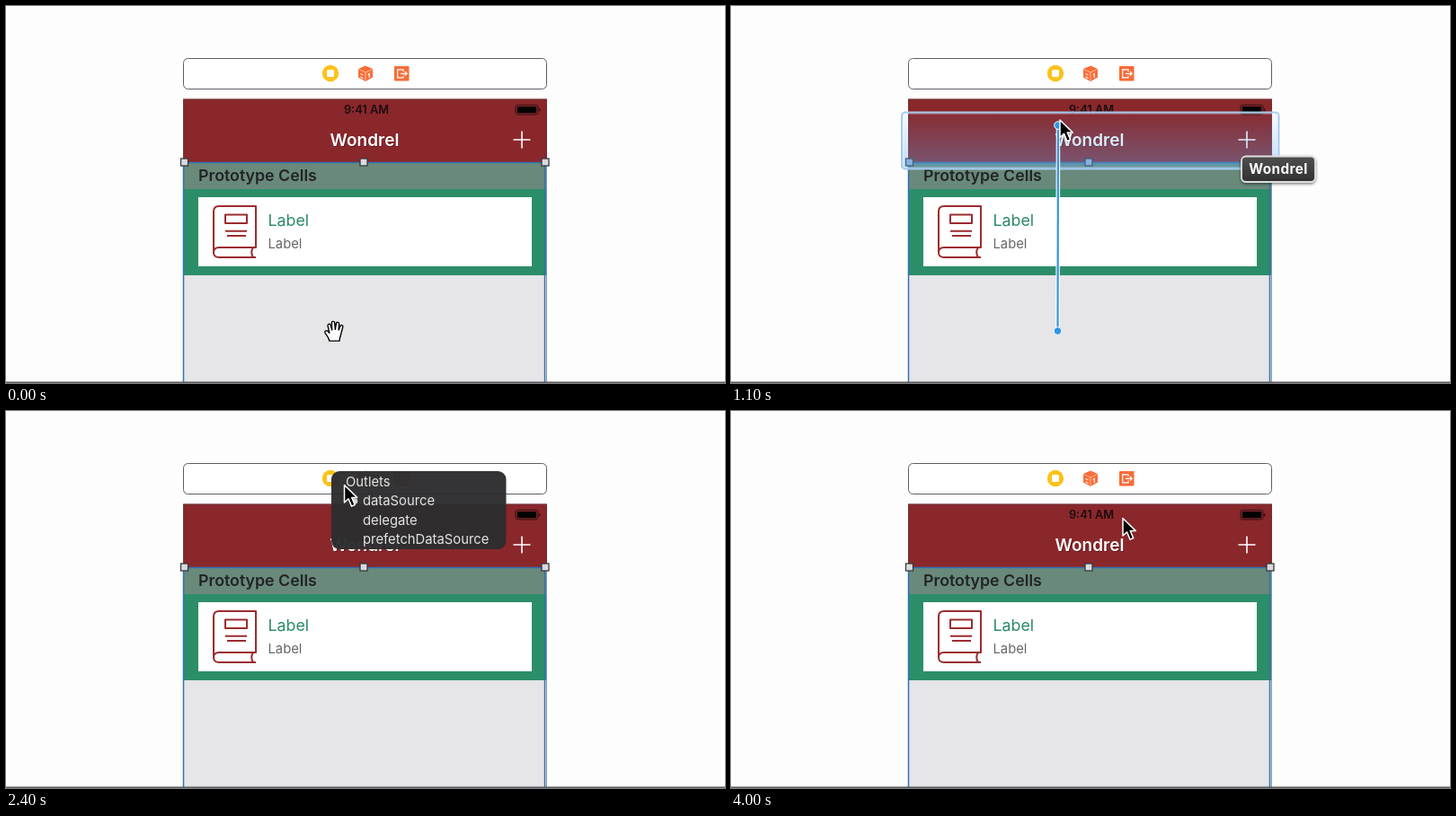
An HTML page for the animation above (4.1 s loop, 800 px wide and 420 px high).

```html
<!DOCTYPE html>
<html lang="en">
<head>
<meta charset="utf-8">
<title>Connecting an outlet</title>
<style>
html, body { margin: 0; width: 100%; height: 100%; overflow: hidden; background: #fefdfe; }
svg { display: block; width: 800px; height: 420px; font-family: Inter, Roboto, sans-serif; }
</style>
</head>
<body>
<svg viewBox="0 0 800 420" xmlns="http://www.w3.org/2000/svg">
  <defs>
    <linearGradient id="tint" x1="0" y1="0" x2="0" y2="1">
      <stop offset="0" stop-color="#5aaaf0" stop-opacity=".04"/>
      <stop offset="1" stop-color="#5aaaf0" stop-opacity=".38"/>
    </linearGradient>
    <linearGradient id="tipFill" x1="0" y1="0" x2="0" y2="1">
      <stop offset="0" stop-color="#505050"/>
      <stop offset="1" stop-color="#303030"/>
    </linearGradient>
    <filter id="soft" x="-20%" y="-40%" width="140%" height="190%">
      <feDropShadow dx="0" dy="1.5" stdDeviation="1.5" flood-opacity=".5"/>
    </filter>
  </defs>

  <rect width="800" height="420" fill="#fefdfe"/>

  <!-- scene dock -->
  <rect x="197.5" y="58.5" width="404" height="34" rx="5" fill="#fff" stroke="#5c5c66"/>
  <rect id="dockHit" x="348" y="62" width="26" height="26" rx="4" fill="#4a8fd8"/>
  <circle cx="361" cy="75" r="9.2" fill="#fcc21c"/>
  <rect x="357" y="71" width="8" height="8" rx="1.5" fill="#fff"/>
  <path d="M400 66.5 408 70V79.5L400 84 392 79.5V70Z" fill="#f96c38"/>
  <path d="M392.5 70.5 400 74 407.5 70.5M400 74V83" fill="none" stroke="#fdc3aa" stroke-width=".9"/>
  <path d="M394.5 75.5 397.5 77M394.5 79 397.5 80.5M402.8 76.5 404.2 75.5V80" fill="none" stroke="#fff" stroke-width="1.1"/>
  <rect x="432" y="67" width="16.5" height="16.5" rx="1" fill="#f96c38"/>
  <path d="M442 73V70.8H435.7V79.8H442V77.6M439 75.3H446M443.8 73 446.2 75.3 443.8 77.6" fill="none" stroke="#fff" stroke-width="1.2"/>

  <!-- navigation bar -->
  <rect x="197" y="103.5" width="405" height="71" fill="#8a272b"/>
  <path d="M197.5 174V104H601.5V174" fill="none" stroke="#5f3b40" stroke-opacity=".6"/>
  <text x="401" y="120" text-anchor="middle" font-size="12.8" font-weight="600" fill="#1c0d0e">9:41 AM</text>
  <rect x="567" y="110.3" width="25" height="10.6" rx="2.5" fill="none" stroke="#2d1011"/>
  <rect x="568.8" y="112" width="21.4" height="7.2" rx="1" fill="#000"/>
  <path d="M593.8 114V117.5" stroke="#2d1011" stroke-width="1.2"/>
  <text x="399.8" y="157" text-anchor="middle" font-size="19" font-weight="600" fill="#4b1013" fill-opacity=".6">Wondrel</text>
  <text x="399" y="156" text-anchor="middle" font-size="19" font-weight="600" fill="#fff">Wondrel</text>
  <path d="M564.5 149H583.5M574 139.5V158.5" stroke="#fff" stroke-width="1.6"/>

  <!-- table -->
  <rect x="197" y="174" width="405" height="30" fill="#69897b"/>
  <text x="214" y="195" font-size="17.8" font-weight="600" fill="#222426">Prototype Cells</text>
  <rect x="197" y="204" width="405" height="96" fill="#2c8e68"/>
  <rect x="214" y="213" width="371" height="77" fill="#fff"/>
  <rect x="197" y="300" width="405" height="120" fill="#e6e5e7"/>
  <g fill="none" stroke="#9b2c2f" stroke-width="2" stroke-linejoin="round">
    <path d="M231 275V229Q231 223 237 223H278V269H237Q231 269 231 274.500Q231 280 237 280H278M275 269Q271.500 274.500 275 280"/>
    <path d="M244 232.500H268V242H244ZM244 250.800H268M246 256H267"/>
  </g>
  <text x="291.500" y="244.500" font-size="17.800" fill="#2a8a65">Label</text>
  <text x="291.500" y="270" font-size="14.800" fill="#66666a">Label</text>
  <path d="M601.5 174V420" stroke="#8b98a4"/>
  <path d="M197.5 420V174.500H599.5V420" fill="none" stroke="#2d73b4" stroke-width="1.500"/>
  <g id="grips" fill="#d9dadd" stroke="#36383c" stroke-width="1.3">
    <rect x="194.500" y="170" width="8" height="8"/>
    <rect x="394" y="170" width="8" height="8"/>
    <rect x="596" y="170" width="8" height="8"/>
  </g>
  <rect y="418.500" width="800" height="1.500" fill="#5b5b60"/>

  <!-- drop target highlights -->
  <g id="tableHit">
    <rect x="190" y="166.500" width="420" height="663" rx="4" fill="url(#tint)" stroke="#adc9e6" stroke-width="1.500"/>
    <path d="M192 420V168.500H608V420" fill="none" stroke="#f4f9ff" stroke-opacity=".45" stroke-width="2"/>
  </g>
  <g id="barHit">
    <rect x="190" y="118.500" width="419.500" height="63" rx="4" fill="url(#tint)" stroke="#a5cbed" stroke-width="2"/>
    <rect x="191.500" y="120" width="416.500" height="60" rx="3" fill="none" stroke="#eef6ff" stroke-opacity=".45"/>
    <rect x="568" y="167.500" width="82" height="28.500" rx="5" fill="url(#tipFill)" stroke="#dededf" stroke-width="1.800" filter="url(#soft)"/>
    <text x="609" y="187" text-anchor="middle" font-size="15.300" font-weight="700" letter-spacing=".4" fill="#fff">Wondrel</text>
  </g>

  <!-- connection line -->
  <g id="wire">
    <path class="wireLine" stroke="#fff" stroke-opacity=".9" stroke-width="4.600"/>
    <path class="wireLine" stroke="#3795d8" stroke-width="2.200"/>
    <circle cx="363.500" cy="362" r="4.300" fill="#2f97e8" stroke="#fff"/>
    <circle id="wireEnd" r="4.300" fill="#2f97e8" stroke="#fff"/>
  </g>

  <!-- outlet menu -->
  <g id="menu" font-size="14.800" fill="#e4e4e5">
    <rect x="362" y="67" width="194.500" height="87" rx="9" fill="#2e2e30" fill-opacity=".97"/>
    <rect id="rowHit" x="362" width="194.500" height="21.500" fill="#111112"/>
    <text x="378" y="83.500">Outlets</text>
    <circle cx="388" cy="100.500" r="3.300" fill="#d0d0d1"/>
    <text x="397" y="105">dataSource</text>
    <text x="397" y="126.500">delegate</text>
    <text x="397" y="148">prefetchDataSource</text>
  </g>

  <!-- pointers -->
  <path id="hand" transform="translate(354 350) scale(1.4)" fill="#fff" stroke="#000" stroke-width="1" stroke-linejoin="round"
    d="M4.200 16.500C3.800 14 2 12 .9 10.400 0 9 1.400 7.600 2.800 8.800L4.200 10.200 2.900 4.600C2.600 3 4.600 2.400 5.100 4L6.200 7.800 6 2.200C6 .6 8.200 .6 8.400 2.200L8.800 7.400 9.600 2.600C9.900 1.200 12 1.400 11.900 3L11.500 7.800 12.800 4.800C13.400 3.400 15.200 4 14.800 5.600 14.200 8 13.800 9.400 13.400 11 13 12.800 12.200 14 12.200 16.500Z"/>
  <path id="arrow" fill="#000" stroke="#fff" stroke-width="1.500" stroke-linejoin="round"
    d="M0 0V19.500L4.500 15.300 8 23.600 11.700 22 8.200 13.900H14.200Z"/>
</svg>
<script>
const LOOP = 4100, STEP = 100;
const ANCHOR = [363.5, 362];
const $ = id => document.getElementById(id);
const lines = document.querySelectorAll('.wireLine');

// each key: time, x, y
const pointerKeys = [
  [500, 364, 358], [600, 363, 334], [700, 362.5, 290], [900, 363.5, 205], [1100, 366, 127],
  [1200, 366, 110], [1300, 365.5, 97], [1400, 365, 86], [1500, 364.5, 79], [1700, 364, 75],
  [2300, 364, 75], [2500, 389, 90], [2700, 420.5, 108], [2900, 433, 117], [3100, 436, 119.5]
];
const wireKeys = [
  [500, 363.5, 362], [600, 362, 342], [700, 360.5, 300], [900, 362, 213], [1100, 364, 133],
  [1200, 363.5, 117], [1300, 363.5, 104], [1400, 363.5, 92], [1500, 363.5, 83], [1700, 363.5, 78]
];

function at(keys, t) {
  const i = keys.findIndex(k => k[0] > t);
  if (i === 0) return keys[0].slice(1);
  if (i < 0) return keys[keys.length - 1].slice(1);
  const [t0, x0, y0] = keys[i - 1], [t1, x1, y1] = keys[i];
  const p = (t - t0) / (t1 - t0);
  return [x0 + (x1 - x0) * p, y0 + (y1 - y0) * p];
}

function show(id, on, opacity = 1) {
  $(id).setAttribute('visibility', on ? 'visible' : 'hidden');
  $(id).setAttribute('opacity', opacity);
}

function render(ms) {
  const t = Math.floor((ms % LOOP) / STEP) * STEP;
  const [px, py] = at(pointerKeys, t);
  const [wx, wy] = at(wireKeys, t);
  const dragging = t >= 600 && t < 2200;

  show('hand', t < 600);
  show('arrow', t >= 600);
  $('arrow').setAttribute('transform', `translate(${px} ${py})`);

  show('wire', dragging);
  lines.forEach(l => l.setAttribute('d', `M${ANCHOR}L${wx} ${wy}`));
  $('wireEnd').setAttribute('cx', wx);
  $('wireEnd').setAttribute('cy', wy);

  show('tableHit', dragging && wy >= 174);
  show('barHit', dragging && wy >= 126 && wy < 174);
  show('dockHit', dragging && wy < 88);
  $('grips').setAttribute('fill', dragging && wy >= 126 && wy < 174 ? '#9fb4d6' : '#d9dadd');

  const row = Math.floor((py + 3 - 89) / 21.5);
  show('menu', t >= 2200 && t < 3200, t >= 3100 ? 0.4 : 1);
  $('rowHit').setAttribute('y', 89 + 21.5 * row);
  $('rowHit').setAttribute('opacity', row >= 0 ? 1 : 0);
}

const start = performance.now();
function tick() {
  render(performance.now() - start);
  requestAnimationFrame(tick);
}
tick();
</script>
</body>
</html>
```
